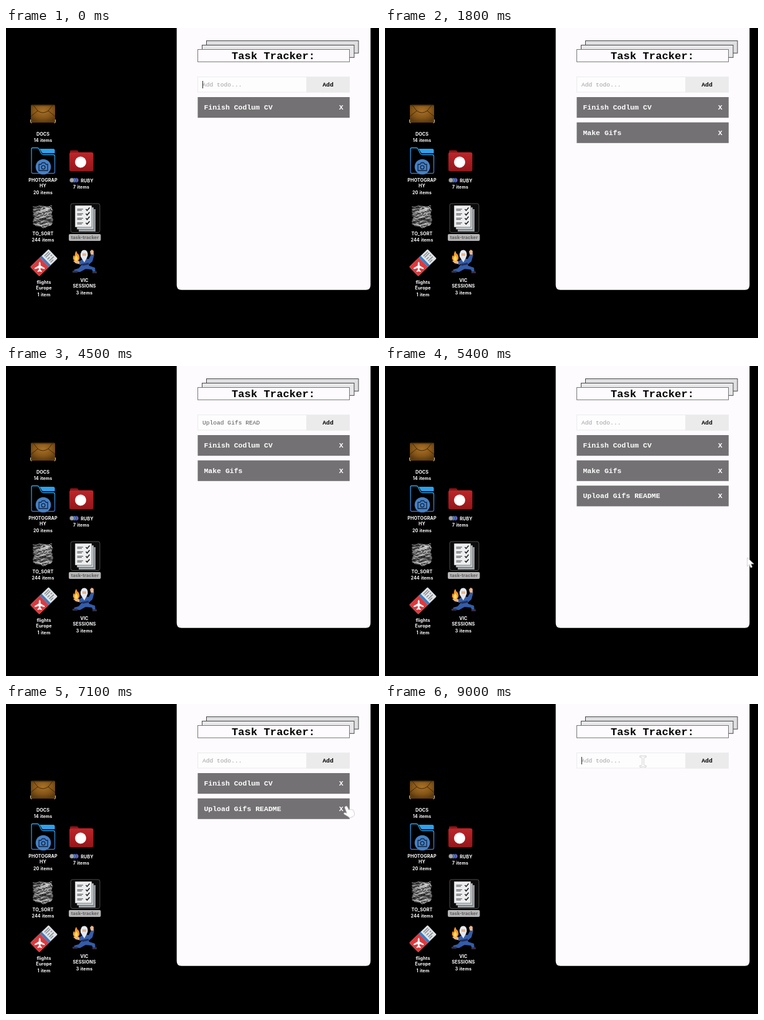
Animation, 600 px wide and 498 px high, one loop 9.2 s. Source, as an HTML page:

```html
<!DOCTYPE html>
<html lang="en">
<head>
<meta charset="utf-8">
<title>Task Tracker</title>
<style>
html, body { margin: 0; width: 100%; height: 100%; overflow: hidden; background: #000; }
svg { display: block; width: 100%; height: 100%; }
text { white-space: pre; }
.mono { font-family: "Liberation Mono", "Courier New", monospace; }
.bold { font-weight: 700; }
.label { font: 700 7.2px Inter, "Open Sans", sans-serif; letter-spacing: .12px; fill: #fff; text-anchor: middle; }
.count { font-size: 7px; word-spacing: .5px; }
#cursor > * { display: none; fill: #fff; stroke: #c6c4c6; stroke-width: .8; stroke-linejoin: round; }
</style>
</head>
<body>
<svg id="stage" viewBox="0 0 600 498" xmlns="http://www.w3.org/2000/svg">
  <defs>
    <radialGradient id="leather" cx=".5" cy=".35" r=".65">
      <stop stop-color="#a87128"/><stop offset=".6" stop-color="#865618"/><stop offset="1" stop-color="#5d3a0e"/>
    </radialGradient>
    <linearGradient id="red" x2="0" y2="1">
      <stop stop-color="#bd2529"/><stop offset="1" stop-color="#96161a"/>
    </linearGradient>
    <linearGradient id="sky" x2="0" y2="1">
      <stop stop-color="#27a9f1"/><stop offset="1" stop-color="#4270c4"/>
    </linearGradient>
  </defs>
  <rect width="600" height="498"/>

  <g id="docs">
    <rect x="40" y="123.500" width="39" height="28.500" rx="2" fill="url(#leather)"/>
    <path d="M40 124.500H79" stroke="#5a390f" stroke-width="1.500"/>
    <path d="M44 124L51 133Q59 139 68 133L75 124M51 133L40 142M68 133L79 142" fill="none" stroke="#3c2508" stroke-width=".9"/>
    <path d="M39.500 147v4q0 1.500 2 1.500M79.500 147v4q0 1.500-2 1.500" fill="none" stroke="#d9c49a"/>
  </g>

  <g id="photos">
    <path d="M54 194H76q2.500 0 2.500 2.500V201H58.500Z" fill="#2aa2ec"/>
    <path d="M43 192.500H50.500q1.500 0 2.300 1.500L57 202q1 1.500 3 1.500H76q2.500 0 2.500 2.500V231q0 2.500-2.500 2.500H43.500q-2.500 0-2.500-2.500V194.500q0-2 2-2Z" fill="#000" stroke="url(#sky)" stroke-width="1.300"/>
    <circle cx="60" cy="223" r="12.300" fill="#4681c6"/>
    <g fill="none" stroke="#10233f" stroke-width="1.300" stroke-linejoin="round">
      <path d="M53 219H56.500L58 216.500H62.500L64 219H67V229H53Z"/>
      <circle cx="60" cy="223.700" r="2.900"/>
    </g>
  </g>

  <g id="ruby">
    <path d="M103 200V198q0-1.500 1.500-1.500H114q1.500 0 2.200 1.500l.8 1.500H137q2 0 2 2V204H103Z" fill="#8e1418"/>
    <rect x="102" y="200" width="38.500" height="30" rx="2" fill="url(#red)"/>
    <circle cx="120" cy="215.500" r="9" fill="#fff"/>
    <g stroke="#000" stroke-width=".5">
      <circle cx="113" cy="244.500" r="3.800" fill="#7a62c9"/>
      <circle cx="109.600" cy="244.500" r="3.800" fill="#4680d8"/>
      <circle cx="106" cy="244.500" r="3.800" fill="#a3a3a7"/>
    </g>
  </g>

  <g id="papers" fill="none"></g>

  <g id="tracker">
    <rect x="104" y="282" width="47" height="46.500" rx="3" fill="#0b0b0b" stroke="#4c4c4c"/>
    <path d="M117 291H144V327H117Z" fill="#9da2a6"/>
    <path d="M114 288H141V323.500H114Z" fill="#c9cdd0" stroke="#222" stroke-width=".5"/>
    <path d="M111 285H138V320H111Z" fill="#eceeef" stroke="#222" stroke-width=".5"/>
    <g id="checks" fill="none" stroke="#1d1d1f"></g>
    <rect x="101" y="331" width="51.500" height="11" rx="2" fill="#b5b5b5"/>
  </g>

  <g id="ticket" transform="translate(61 377) rotate(-44)">
    <rect x="-20.500" y="-10.500" width="41" height="21" rx="1.500" fill="#dfe3e6"/>
    <path d="M-19-10.500H1V10.500H-19q-1.500 0-1.500-1.500V-9q0-1.500 1.500-1.500Z" fill="#dc3a3e"/>
    <path d="M1-10.500H5V10.500H1Z" fill="#3c7cbd"/>
    <path d="M8-7H18M8-4H18M8 0H13M15 0H18M8 4H18M8 7H14" stroke="#80898f" stroke-width="1.400"/>
    <path transform="translate(-9.500 0) rotate(44)" d="M0-8q1.400 1 1.400 3v3L8 2V4L1.400 2V5L3.500 7V8.300L0 7.300L-3.500 8.300V7L-1.400 5V2L-8 4V2L-1.400-2V-5q0-2 1.400-3Z" fill="#fff"/>
  </g>

  <g id="mage">
    <path d="M113 358q1 4 4 6 3 6-1 10-3 2-6 0-4-4-1-9l2 2q-1-5 2-9Z" fill="#f6962a"/>
    <path d="M113 365q4 4 2 8-2 2-4 0-2-3 2-8Z" fill="#ffd95a"/>
    <path d="M108 374H116L121 376V380L112 378Z" fill="#e8b48c"/>
    <path d="M118 375L125 370L133 371L137 364H142L139 375L133 380L134 382L143 385L144 392H140L138 388L128 387L119 392L109 391L110 388L117 386L123 379L118 380Z" fill="#345ca8"/>
    <path d="M136.500 364L135 359L138 356L141 358V364Z" fill="#e8b48c"/>
    <path d="M120 367q-1-10 6-10.500 6 .5 5.500 9l-1.500 4-4 7-4-6Z" fill="#e6e8ee"/>
    <path d="M123 362H129V366H123Z" fill="#e8b48c"/>
    <path d="M122 379L133 377V380L123 382Z" fill="#1e2f60"/>
    <path d="M107 390H115V393H107ZM139 391H146V394H139Z" fill="#3b2d45"/>
  </g>

  <g id="labels"></g>

  <path d="M274.600 0H586.400V413q0 7.700-7.500 7.700H282.100q-7.500 0-7.500-7.700Z" fill="#fdfbfe"/>
  <g stroke="#484848">
    <rect x="322.500" y="20.500" width="244.500" height="19.800" fill="#dfdee0"/>
    <rect x="315.500" y="27.500" width="244.500" height="19.800" fill="#e8e7e9"/>
    <rect x="308.500" y="34.500" width="244" height="19.800" fill="#fdfbfe" stroke="#777"/>
  </g>
  <text class="mono bold" x="430" y="50" font-size="17.200" text-anchor="middle">Task Tracker:</text>
  <rect x="308.500" y="78.500" width="244" height="24.500" fill="#fefdfe" stroke="#ebeaec"/>
  <rect x="483" y="78" width="70" height="25.500" fill="#ebebec"/>
  <text class="mono bold" x="518" y="94" font-size="9.700" text-anchor="middle">Add</text>
  <text id="field" class="mono" x="316" y="94" font-size="9.620"></text>
  <g id="rows"></g>
  <rect id="caret" y="85" width="1" height="12" fill="#222"/>

  <g id="cursor">
    <path id="arrow" d="M0 0V14L3.300 11L5.500 16L8 15L5.800 10H10.500Z"/>
    <path id="hand" d="M1 .5Q3-.8 4.200 1.600L6.500 6.200Q8 4.800 9.200 6Q10.600 4.800 11.800 6Q13.600 5.300 14.200 7.300L15.600 12Q16 15 13.200 17L7.500 19L6 17.200L-1 13Q-2.500 11.500-.6 10.700L3.300 11.300L.1 3Q-.4 1.300 1 .5Z"/>
    <path id="beam" d="M-5-9H-2Q0-9 0-8Q0-9 2-9H5V-6.500H2.500Q1.400-6.500 1.400-5V5Q1.400 6.500 2.500 6.500H5V9H2Q0 9 0 8Q0 9-2 9H-5V6.500H-2.500Q-1.400 6.500-1.400 5V-5Q-1.400-6.500-2.500-6.500H-5Z"/>
  </g>
</svg>
<script>
const LOOP = 9200, STEP = 100, TEXT_X = 316, CHAR_W = 5.772;
const $ = id => document.getElementById(id);

function add(parent, tag, attrs, text = '') {
  const node = document.createElementNS('http://www.w3.org/2000/svg', tag);
  for (const key in attrs) node.setAttribute(key, attrs[key]);
  node.textContent = text;
  parent.append(node);
  return node;
}

// Desktop labels: centre x, first baseline, name lines, item count
[
  [59.5, 173, ['DOCS'], '14 items'],
  [59.5, 247, ['PHOTOGRAP', 'HY'], '20 items'],
  [59.5, 333, ['TO_SORT'], '244 items'],
  [61, 411, ['flights', 'Europe'], '1 item'],
  [126, 408, ['VIC', 'SESSIONS'], '3 items']
].forEach(([x, y, lines, count]) => {
  lines.forEach((line, i) => add($('labels'), 'text', { class: 'label', x, y: y + i * 9.2 }, line));
  add($('labels'), 'text', { class: 'label count', x, y: y + lines.length * 9.8 }, count);
});
add($('labels'), 'text', { class: 'label', x: 130.5, y: 248 }, 'RUBY');
add($('labels'), 'text', { class: 'label count', x: 121, y: 257.5 }, '7 items');
add($('labels'), 'text', { class: 'label', x: 127, y: 339.3, style: 'fill:#5c5c5c' }, 'task-tracker');

for (let i = 0; i < 4; i++) {
  const y = 291 + i * 7.3;
  add($('checks'), 'path', { d: `M114.500 ${y}H124M114.500 ${y + 2}H122`, 'stroke-width': 0.8 });
  add($('checks'), 'path', { d: `M128.500 ${y}l2 2.200 4-4.700`, 'stroke-width': 1.5 });
}

// Crumpled sheets, drawn from a seeded generator
let seed = 7;
const random = () => (seed = seed * 16807 % 2147483647) / 2147483647;
add($('papers'), 'path', { d: 'M45 288L54 285L71 287L75 292L73 301L76 308L73 317L62 320L47 318L43 311L46 302L43 295Z', fill: '#666' });
for (let i = 0; i < 110; i++) {
  const x = 43 + random() * 22, y = 287 + i * 0.28;
  const shade = Math.round(random() < 0.45 ? random() * 60 : 140 + random() * 110);
  const bend = () => (random() * 5 - 2.5).toFixed(1);
  add($('papers'), 'path', {
    d: `M${x} ${y}q${2 + random() * 3} ${bend()} 6 ${bend()}t5 ${bend()}`,
    stroke: `rgb(${shade},${shade},${shade})`, 'stroke-width': 0.9
  });
}

const rowNodes = [0, 1, 2].map(i => {
  const row = add($('rows'), 'g', { transform: `translate(0 ${i * 40.6})` });
  const style = { class: 'mono bold', y: 131, 'font-size': 11.5, fill: '#fff' };
  add(row, 'rect', { x: 308.4, y: 111, width: 244.4, height: 33.2, fill: '#737173' });
  row.label = add(row, 'text', { ...style, x: 318.4 });
  add(row, 'text', { ...style, x: 535.8 }, 'X');
  return row;
});

const FIRST = 'Finish Codlum CV', SECOND = 'Make Gifs', THIRD = 'Upload Gifs README';
const lists = [
  [0, [FIRST]], [1700, [FIRST, SECOND]], [4900, [FIRST, SECOND, THIRD]],
  [6600, [FIRST, THIRD]], [7300, [FIRST]], [8100, []]
];

// One entry per step: time, field text, caret shown
const typing = (start, text, lengths) =>
  lengths.map((n, i) => [start + i * STEP, text.slice(0, n), true]);
const field = [
  [0, '', true], [100, '', false], [600, '', true],
  ...typing(800, SECOND, [1, 2, 3, 4, 5, 6, 7, 9]),
  [1700, '', true], [1800, '', false], [2000, '', true],
  ...typing(2200, THIRD, [1, 2, 3, 4, 5, 6, 7, 8, 9, 11, 12]),
  ...typing(3400, THIRD, [13, 14, 15, 16]),
  ...typing(3900, 'Upload Gifs READme', [17, 18, 17, 16]),
  [4400, 'Upload Gifs READ', false],
  ...typing(4600, THIRD, [17, 18]),
  [4900, '', true], [5200, '', false], [5700, '', true], [6200, '', false], [9000, '', true]
];

const path = [
  [5300, 584, 312], [6300, 540, 165], [6700, 540, 165], [7100, 545, 164],
  [7400, 545, 164], [7900, 544, 126], [8200, 544, 126], [8900, 415, 92.3], [LOOP, 415, 92.3]
];

const latest = (list, t) => list.findLast(entry => entry[0] <= t);

function pointerAt(t) {
  const i = path.findIndex(point => point[0] > t);
  const [t0, x0, y0] = path[i - 1], [t1, x1, y1] = path[i];
  const p = (t - t0) / (t1 - t0), eased = p * p * (3 - 2 * p);
  return [x0 + (x1 - x0) * eased, y0 + (y1 - y0) * eased];
}

function cursorKind(x, y, rowCount) {
  if (y > 78 && y < 104 && x > 308 && x < 553) return x < 483 ? 'beam' : 'hand';
  const row = Math.floor((y - 111) / 40.6);
  const overRow = row >= 0 && row < rowCount && y - 111 - row * 40.6 < 33.3;
  return overRow && x > 533 && x < 550 ? 'hand' : 'arrow';
}

function draw(t) {
  const [, items] = latest(lists, t);
  rowNodes.forEach((row, i) => {
    row.style.display = i < items.length ? '' : 'none';
    row.label.textContent = items[i] || '';
  });

  const [, text, caret] = latest(field, t);
  $('field').textContent = text || 'Add todo...';
  $('field').setAttribute('fill', text ? '#555' : '#a09ea0');
  $('caret').setAttribute('x', Math.round(TEXT_X + text.length * CHAR_W));
  $('caret').style.display = caret ? '' : 'none';

  const moving = t >= 5400;
  $('cursor').style.display = moving ? '' : 'none';
  if (moving) {
    const [x, y] = pointerAt(t), kind = cursorKind(x, y, items.length);
    $('cursor').setAttribute('transform', `translate(${x} ${y})`);
    for (const shape of $('cursor').children) shape.style.display = shape.id === kind ? 'inline' : 'none';
  }
}

const start = performance.now();
function tick() {
  const t = (performance.now() - start) % LOOP;
  draw(Math.floor(t / STEP) * STEP);
  requestAnimationFrame(tick);
}
tick();
</script>
</body>
</html>
```
